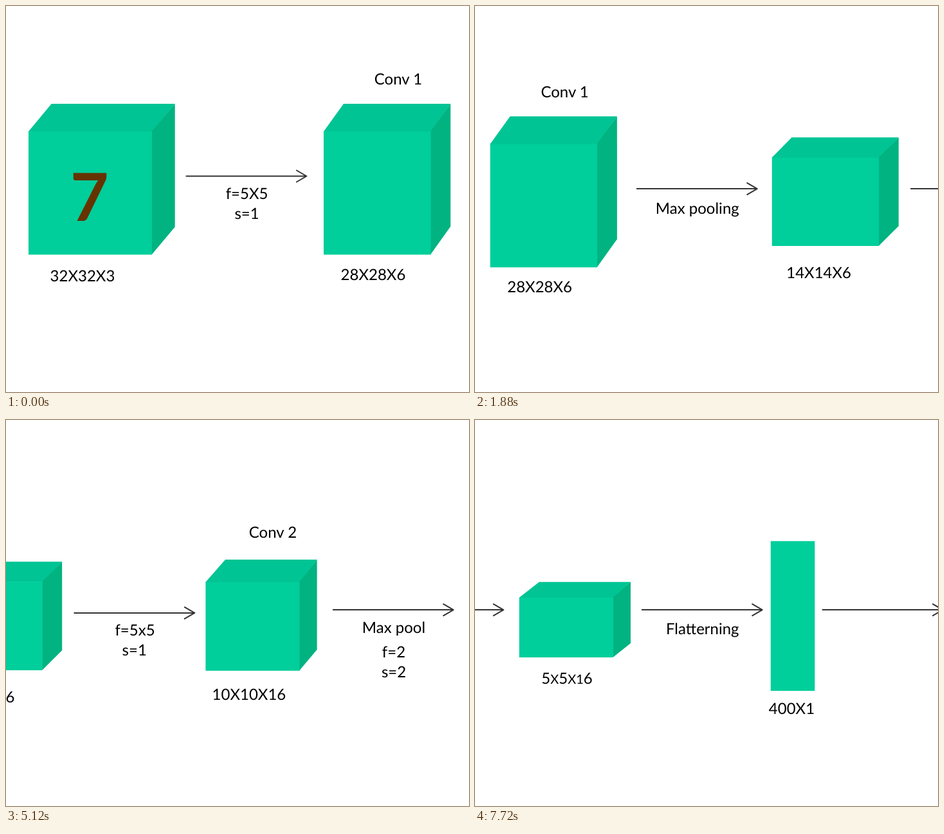
An HTML page for the animation above (8 s loop, 720 by 600 pixels).

```html
<!DOCTYPE html>
<html lang="en">
<head>
<meta charset="utf-8">
<title>Convolution pipeline</title>
<style>
  html, body { margin: 0; width: 100%; height: 100%; overflow: hidden; background: #fff; }
  svg { display: block; }
  text { font: 24px Lato, sans-serif; text-anchor: middle; text-rendering: geometricPrecision; }
  .small { font-size: 20px; }
  .digit { font-size: 103px; font-weight: 700; fill: #630; }
  .arrow { fill: none; stroke: #333; stroke-width: 2; stroke-linecap: round; stroke-linejoin: round; }
  .front { fill: #00ce9b; }
  .top { fill: #00c494; }
  .side { fill: #00b380; }
</style>
</head>
<body>
<svg width="720" height="600" viewBox="0 0 720 600"><g id="world"></g></svg>
<script>
const world = document.getElementById('world');

const path = (cls, d) => `<path class="${cls}" d="${d}"/>`;
const label = (x, y, text, cls = '') => `<text class="${cls}" x="${x}" y="${y}">${text}</text>`;
const small = text => `<tspan class="small">${text}</tspan>`;
const arrow = (x, y) => path('arrow', `M${x} ${y}h187m-15.5-9l15.5 9l-15.5 9`);

// Front face from (l, t) to (r, b), back face from (bl, bt) to (br, bb).
const box = (l, t, r, b, bl, bt, br, bb) =>
  path('top', `M${l} ${t + .5}V${t}L${bl} ${bt}H${br}L${r} ${t + .5}z`) +
  path('side', `M${r - .5} ${t}L${br} ${bt}V${bb}L${r - .5} ${b}z`) +
  path('front', `M${l} ${t}H${r}V${b}H${l}z`);

world.innerHTML = [
  box(35, 195, 227, 386.6, 70.7, 152, 262.7, 343.5),
  label(129.8, 334, '7', 'digit'),
  label(119, 427.6, '32X32X3'),

  arrow(280.4, 264.5),
  label(374.5, 299.8, 'f=5X5'),
  label(374.5, 330.9, 's=1'),

  label(610, 122, 'Conv 1'),
  box(494, 195, 660.5, 386.6, 525, 152, 691.3, 342.8),
  label(571, 425.7, '28X28X6'),

  arrow(722.2, 264.5),
  label(816.2, 303, 'Max pooling'),

  box(932.2, 215.8, 1098.6, 353.4, 963, 184.7, 1129.2, 322.4),
  label(1005, 403.4, '14X14X6'),

  arrow(1148.3, 264.5),
  label(1242.5, 300, 'f=5x5'),
  label(1241.7, 331, 's=1'),

  label(1457, 147.7, 'Conv 2'),
  box(1352.4, 216.5, 1498.5, 354.2, 1383, 181.4, 1525.6, 321.6),
  label(1419.9, 399.9, '10X10X16'),

  arrow(1550.8, 259.6),
  label(1645, 295.6, 'Max pool'),
  label(1645, 333.3, 'f=2'),
  label(1645, 364.6, 's=2'),

  box(1762.3, 240.4, 1908.4, 333.4, 1793.4, 216.2, 1935.5, 311.5),
  label(1836.5, 374.2, `5${small('X')}5${small('X1')}6`),

  arrow(1953.3, 259.6),
  label(2047.3, 297, 'Flatterning'),

  path('front', 'M2153.3 152.7H2221.9V385.6H2153.3z'),
  label(2186, 421.6, '400X1'),

  arrow(2234, 259.6)
].join('');

// Camera pans at constant speed: start, end, shift in x and y.
const pans = [
  [920, 1880, -470.4, 19.6],
  [2840, 3800, -405.1, 21.5],
  [4760, 5760, -462.5, -15.6],
  [6720, 7720, -355.5, 10]
];
const LOOP = 8000, STEP = 40;

function draw(now) {
  const t = Math.floor(now % LOOP / STEP) * STEP;
  let x = 0, y = 0;
  for (const [start, end, dx, dy] of pans) {
    const p = Math.min(1, Math.max(0, (t - start) / (end - start)));
    x += p * dx;
    y += p * dy;
  }
  world.setAttribute('transform', `translate(${x} ${y})`);
}

const begin = performance.now();
function tick() {
  draw(performance.now() - begin);
  requestAnimationFrame(tick);
}
tick();
</script>
</body>
</html>
```
